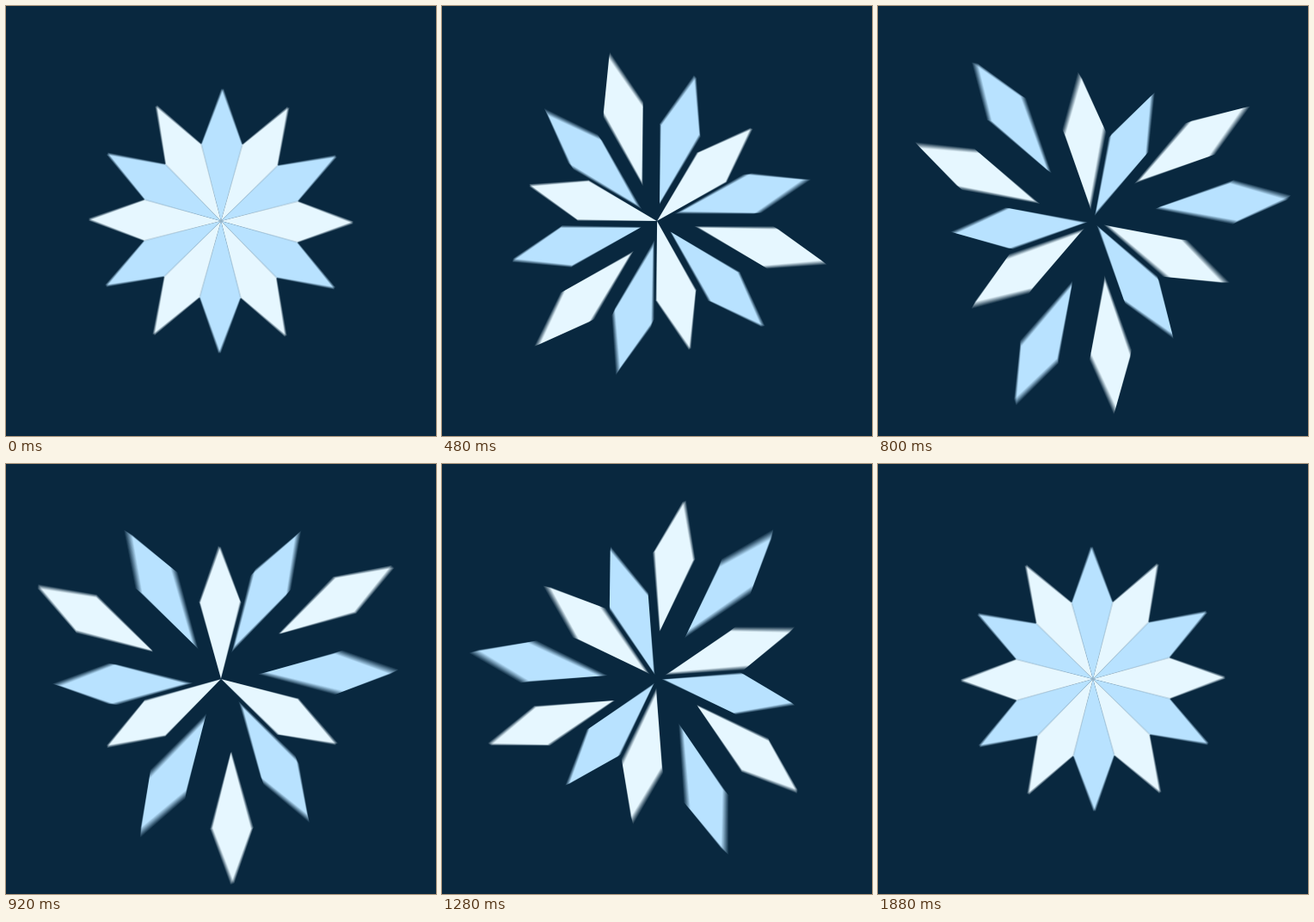
An HTML page with a canvas for the animation above (1.92 s loop, 500 by 500 pixels).

```html
<!DOCTYPE html>
<html>
<head>
<meta charset="utf-8">
<style>
  html, body { margin: 0; width: 100%; height: 100%; overflow: hidden; background: #09283f; }
  canvas { display: block; }
</style>
</head>
<body>
<canvas id="stage" width="500" height="500"></canvas>
<script>
const SIZE = 500, STEPS = 48, STEP_MS = 40, SAMPLES = 12;
const PETALS = 12, SPREAD = 86, LAG = 7.2 * Math.PI / 180;
const BACK = '#09283f', COLORS = ['#b8e2ff', '#e6f7ff'];

const out = document.getElementById('stage').getContext('2d');
const layer = document.createElement('canvas');
layer.width = layer.height = SIZE;
const ctx = layer.getContext('2d');
const kite = new Path2D('M0 0L23.8 -88.9L0 -154L-23.8 -88.9Z');

const smooth = u => u * u * (3 - 2 * u);

// One sharp moment of the loop, t in 0..1
function drawFlower(t) {
  const spread = SPREAD * smooth((1 - Math.cos(2 * Math.PI * t)) / 2);
  ctx.fillStyle = BACK;
  ctx.fillRect(0, 0, SIZE, SIZE);
  for (let i = 0; i < PETALS; i++) {
    const d = spread * (1 + Math.sin(4 * Math.PI * t + i * Math.PI / 2)) / 2;
    ctx.save();
    ctx.translate(SIZE / 2, SIZE / 2);
    ctx.rotate(i * Math.PI / 6 + t * Math.PI / 3);
    ctx.translate(-d * Math.sin(LAG), -d * Math.cos(LAG));
    ctx.fillStyle = COLORS[i % 2];
    ctx.fill(kite);
    ctx.restore();
  }
}

// Motion blur: running average of moments across each step
function drawStep(step) {
  for (let k = 0; k < SAMPLES; k++) {
    drawFlower((step + (k + 0.5) / SAMPLES) / STEPS);
    out.globalAlpha = 1 / (k + 1);
    out.drawImage(layer, 0, 0);
  }
}

let shown = -1;
function tick() {
  const step = Math.floor(performance.now() / STEP_MS) % STEPS;
  if (step !== shown) drawStep(shown = step);
  requestAnimationFrame(tick);
}
tick();
</script>
</body>
</html>
```
